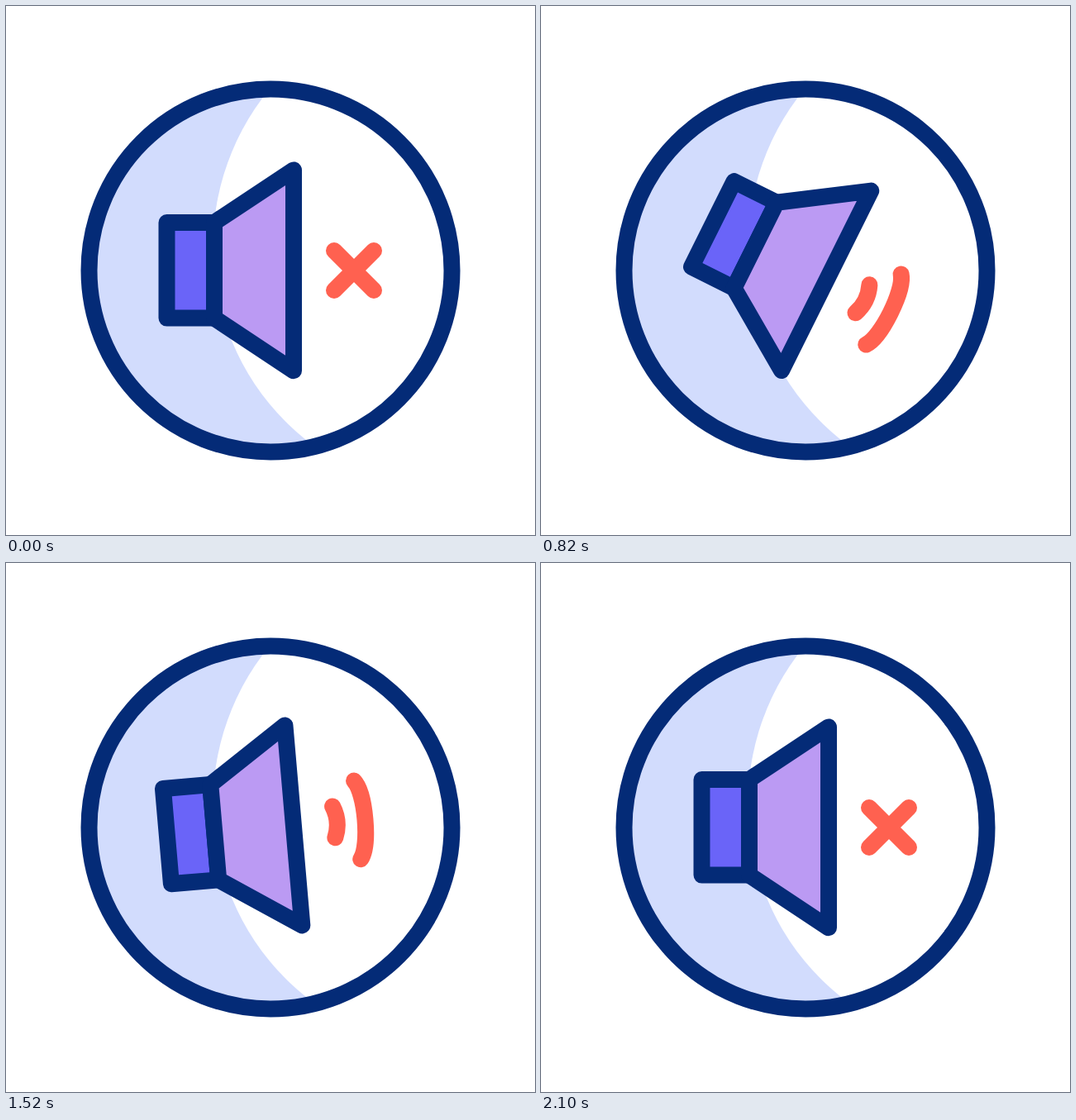
Recreate the animation shown at these times as an HTML page. Size 640x640 px, loop 2.42 s.

```html
<!DOCTYPE html>
<html lang="en">
<head>
<meta charset="utf-8">
<title>Sound toggle</title>
<style>
html, body { margin: 0; width: 100%; height: 100%; overflow: hidden; background: #fff; }
svg { display: block; width: 100vw; height: 100vh; }
.line { stroke: #042b77; stroke-width: 20; stroke-linecap: round; stroke-linejoin: round; }
.red { fill: none; stroke: #ff6150; stroke-width: 20; stroke-linecap: round; }
</style>
</head>
<body>
<svg viewBox="0 0 640 640">
  <defs>
    <clipPath id="disc"><circle cx="320" cy="320" r="219"/></clipPath>
  </defs>
  <circle cx="320" cy="320" r="219" fill="#d2dcfd"/>
  <circle cx="550" cy="291" r="299.5" fill="#fff" clip-path="url(#disc)"/>
  <circle class="line" cx="320" cy="320" r="219.5" fill="none"/>
  <g id="speaker">
    <path class="line" fill="#6a64f8" d="M194.5 262H252V377.6H194.5Z"/>
    <path class="line" fill="#bb9af3" d="M252 262L348 198.4V441.3L252 377.6Z"/>
    <path class="red" id="waves" d="M397 301C402 313 402 327 397 339M425.5 272.5C438 288 438 352 425.5 367.5"/>
    <path class="red" id="cross" d="M397 296L445 344M445 296L397 344"/>
  </g>
</svg>
<script>
const LOOP = 2420;
const [speaker, waves, cross] = ['speaker', 'waves', 'cross'].map(id => document.getElementById(id));

// Keys are [time in ms, value], eased in and out between neighbours.
const tilt = [[388, 0], [830, 26.5], [1400, -8.7], [1665, 0]];
const crossSize = [[100, 1], [250, 0], [1950, 0], [2100, 1]];
const waveSize = [[250, 0], [400, 1], [1800, 1], [1950, 0]];

function valueAt(keys, t) {
  if (t <= keys[0][0]) return keys[0][1];
  for (let i = 1; i < keys.length; i++) {
    const [t0, a] = keys[i - 1], [t1, b] = keys[i];
    if (t < t1) return a + (b - a) * (1 - Math.cos(Math.PI * (t - t0) / (t1 - t0))) / 2;
  }
  return keys[keys.length - 1][1];
}

function scale(el, size) {
  el.setAttribute('visibility', size > 0.001 ? 'visible' : 'hidden');
  el.setAttribute('transform', `translate(421 320) scale(${size}) translate(-421 -320)`);
}

const start = performance.now();
function draw() {
  const t = (performance.now() - start) % LOOP;
  speaker.setAttribute('transform', `rotate(${valueAt(tilt, t)} 320 320)`);
  scale(cross, valueAt(crossSize, t));
  scale(waves, valueAt(waveSize, t));
  requestAnimationFrame(draw);
}
draw();
</script>
</body>
</html>
```
